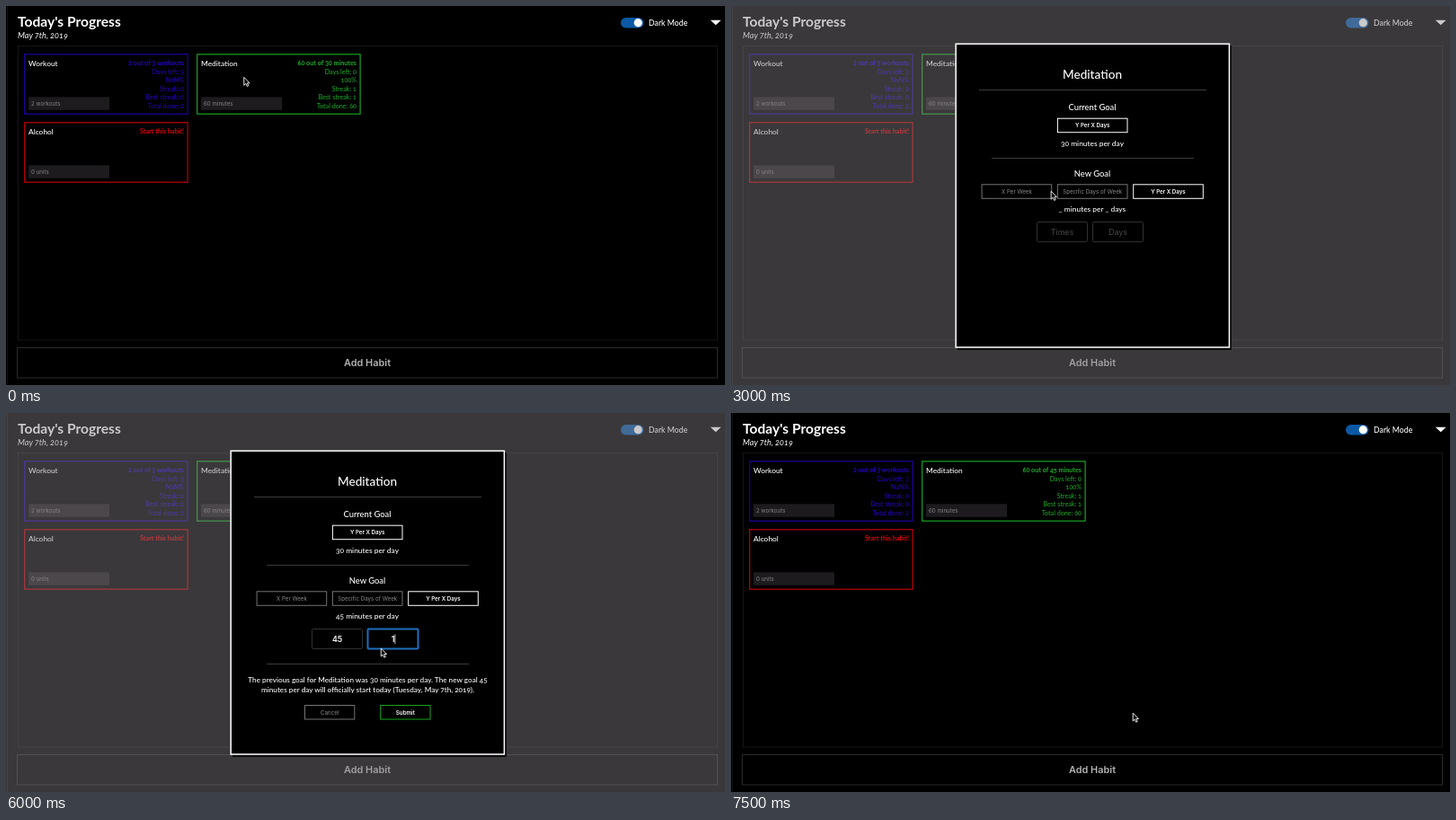
Animation of 800x422 px, one loop 8 s. Source, as an HTML page:

```html
<!DOCTYPE html>
<html lang="en">
<head>
<meta charset="utf-8">
<title>Habit tracker</title>
<style>
  html, body { margin: 0; width: 100%; height: 100%; overflow: hidden; background: #000; }
  svg { display: block; width: 100vw; height: 100vh; }
  text { font: 500 8.4px Lato, sans-serif; font-variant-numeric: oldstyle-nums; fill: #fff; }
  rect { fill: none; stroke-width: 1; }
  .mid { text-anchor: middle; }
  .end { text-anchor: end; }
  .title { font-size: 15.6px; font-weight: 700; }
  .date { font-size: 9.2px; font-weight: 400; font-style: italic; }
  .mode { font-size: 8.75px; }
  .stat { font-size: 7.2px; font-weight: 400; }
  .bold { font-weight: 700; }
  .ui { font: 6.2px Inter, sans-serif; }
  .hint { fill: #858385; }
  .add { font: 600 10.9px Inter, sans-serif; fill: #b4b4b4; }
  .heading { font-size: 13.6px; }
  .sub { font-size: 9.4px; }
  .message { font-size: 8.2px; }
  .field { font: 8.8px Inter, sans-serif; }
  .strong { font-weight: 600; }
  .faint { fill: #484848; }
  .muted { fill: #8a8a8a; }
  .entry { fill: #1d1b1d; }
  .panel { stroke: #151515; }
  .wide { stroke: #2a2a2a; }
  .grey { stroke: #747474; }
  .white { stroke: #fff; }
  .dark { stroke: #303030; }
  .menu { fill: #000; stroke: #2b2b2b; }
  .focus { stroke: #1d6fbe; stroke-width: 2; }
  .green { stroke: #16a51c; }
  .rule { stroke: #3a3a3a; }
</style>
</head>
<body>
<svg id="stage" viewBox="0 0 800 422" preserveAspectRatio="none"></svg>
<script>
const LOOP = 8000, STEP = 100;
const OPEN = 1500, FOCUS = 3800, FOUR = 4500, FIVE = 4600, NEXT = 5000, ONE = 5200, HOVER = 6700, CLOSE = 7300;

const text = (x, y, cls, str, attrs = '') => `<text x="${x}" y="${y}" class="${cls}" ${attrs}>${str}</text>`;
const rect = (x, y, w, h, cls, attrs = '') =>
  `<rect x="${x}" y="${y}" width="${w}" height="${h}" class="${cls}" ${attrs}/>`;
const rule = (x1, x2, y) => `<path d="M${x1} ${y}H${x2}" class="rule"/>`;
// Shown while the loop time lies in one of the [from, to) spans.
const during = (spans, body) => `<g data-on="${spans}">${body}</g>`;

const button = (x, y, w, label, border, cls) =>
  rect(x, y, w, 15.5, border) + text(x + w / 2, y + 10, 'ui mid ' + cls, label);

const card = (x, y, name, entry, border, color, stats) =>
  rect(x + .7, y + .8, 181.4, 66.4, '', `style="stroke:${border};stroke-width:1.2"`) +
  text(x + 5, y + 13.7, '', name) +
  rect(x + 5, y + 48.3, 90, 14.5, 'entry') + text(x + 8, y + 57.7, 'ui hint', entry) +
  stats.map((s, i) => text(x + 178, y + 13.3 + i * 9.5, 'stat end ' + (i ? '' : 'bold'), s, `style="fill:${color}"`)).join('');

const stats = (goal, left, rate, streak, total) =>
  [goal, 'Days left: ' + left, rate, 'Streak: ' + streak, 'Best streak: ' + streak, 'Total done: ' + total];
const meditation = minutes => card(212, 53, 'Meditation', '60 minutes', '#18a324', '#1fae2a',
  stats(`60 out of ${minutes} minutes`, 0, '100%', 1, 60));

const page =
  rect(0, 0, 800, 422, '', 'style="fill:#000"') +
  '<path d="M1.5 0V422" stroke="#121212"/>' +
  text(13, 22.6, 'title', "Today's Progress") + text(13, 36.4, 'date', 'May 7th, 2019') +
  '<rect x="684" y="13" width="25.5" height="11.4" rx="5.7" style="fill:#0b58a5"/><circle cx="703.3" cy="18.7" r="4.6" fill="#fff"/>' +
  text(715, 21.6, 'mode', 'Dark Mode') + '<path d="M783.8 15.8H795.6L789.7 21.3Z" fill="#fff"/>' +
  rect(13.5, 44.5, 778, 327.5, 'panel') +
  card(20, 53, 'Workout', '2 workouts', '#1f00a0', '#2700c4', stats('2 out of 3 workouts', 3, 'NaN%', 0, 2)) +
  during(`0-${CLOSE}`, meditation(30)) + during(`${CLOSE}-${LOOP}`, meditation(45)) +
  card(20, 129, 'Alcohol', '0 units', '#c00008', '#e00008', ['Start this habit!']) +
  rect(12.5, 380.5, 779, 33.5, 'wide') + text(402, 401.3, 'add mid', 'Add Habit');

const menu =
  during(`300-${OPEN}`, '<path d="M263 60.8H271.2L267.1 64.8Z" fill="#fff"/>') +
  during(`800-${OPEN}`, ['Suspend', 'Edit Goal', 'Add Note'].map((label, i) =>
    rect(263.5, 67.3 + i * 13, 51, 13, 'menu') + text(289, 76.3 + i * 13, 'ui mid', label)).join('')) +
  during(`1200-${OPEN}`, rect(263.5, 80.5, 50.5, 13.3, 'white'));

const goalLine = (spans, str) => during(spans, text(402, 229, 'mid', str));
const field = (spans, x, border, str, cls = '') =>
  during(spans, rect(x, 240.5, 56, 22, border, 'rx="1"') + text(x + 28, 254.9, 'field mid ' + cls, str));
const caret = (spans, x) => during(spans, `<path d="M${x} 246.5V257" stroke="#fff" stroke-width=".8"/>`);

const dialog = during(`${OPEN}-${CLOSE}`,
  rect(0, 0, 800, 422, '', 'style="fill:rgb(135,130,135);fill-opacity:.43"') +
  rect(252, 44, 305, 339, '', 'style="fill:#000;fill-opacity:.8"') +
  rect(250.2, 42.2, 304.2, 337.8, 'white', 'style="fill:#000;stroke-width:1.5"') +
  text(402, 80.6, 'heading mid', 'Meditation') + rule(276, 529, 93.5) +
  text(402, 116.2, 'sub mid', 'Current Goal') +
  button(363.4, 125.2, 77.6, 'Y Per X Days', 'white', 'strong') +
  text(402, 156, 'mid', '30 minutes per day') + rule(290, 515, 169.5) +
  text(402, 190, 'sub mid', 'New Goal') +
  button(279.1, 198.8, 77.6, 'X Per Week', 'grey', 'muted') +
  button(363.4, 198.8, 77.6, 'Specific Days of Week', 'grey', 'muted') +
  button(447.7, 198.8, 77.6, 'Y Per X Days', 'white', 'strong') +
  goalLine(`0-${FOUR}`, '_ minutes per _ days') + goalLine(`${FOUR}-${FIVE}`, '4 minutes per _ days') +
  goalLine(`${FIVE}-${ONE}`, '45 minutes per _ days') + goalLine(`${ONE}-${LOOP}`, '45 minutes per day') +
  field(`0-${FOCUS}`, 340.5, 'dark', 'Times', 'faint') + field(`${FOCUS}-${FOUR}`, 340.5, 'focus', 'Times', 'faint') +
  field(`${FOUR}-${FIVE}`, 340.5, 'focus', '4', 'strong') + field(`${FIVE}-${NEXT}`, 340.5, 'focus', '45', 'strong') +
  field(`${NEXT}-${LOOP}`, 340.5, 'dark', '45', 'strong') +
  field(`0-${NEXT}`, 402.5, 'dark', 'Days', 'faint') + field(`${NEXT}-${ONE}`, 402.5, 'focus', 'Days', 'faint') +
  field(`${ONE}-${LOOP}`, 402.5, 'focus', '1', 'strong') +
  caret(`${FOCUS}-4300`, 368.5) + caret(`${FOUR}-${FIVE}`, 371.9) + caret(`${FIVE}-${NEXT}`, 374.8) +
  caret(`${NEXT}-${ONE}`, 430.5) + caret(`${ONE}-5600,6000-6600,7100-${CLOSE}`, 432.9) +
  during(`${ONE}-${CLOSE}`,
    rule(290, 515, 279.5) +
    text(402.5, 299.8, 'message mid', 'The previous goal for Meditation was 30 minutes per day. The new goal 45') +
    text(402.5, 310.9, 'message mid', 'minutes per day will officially start today (Tuesday, May 7th, 2019).') +
    button(332.5, 325.5, 55.3, 'Cancel', 'grey', 'muted') +
    during(`${HOVER}-${CLOSE}`, rect(416.7, 325.5, 55.3, 15.5, '', 'style="fill:#0a9c0c"')) +
    button(416.7, 325.5, 55.3, 'Submit', 'green', 'strong')));

const pointers =
  during(`0-500,1500-3500,5800-${HOVER},${CLOSE}-${LOOP}`,
    '<path d="M0 0V9L2.1 7.1L3.5 10.2L5 9.5L3.6 6.5H6.3Z" fill="#000" stroke="#fff" stroke-width=".9"/>') +
  during(`500-1500,${HOVER}-${CLOSE}`,
    '<path d="M0 .7Q.8-.5 1.5 .7V3.6L4.9 4.4Q5.7 4.8 5.4 6.2L4.6 9.6H.6L-2.2 6Q-2.2 4.8-1 5.2L0 6Z" fill="#fff" stroke="#000" stroke-width=".7"/>') +
  during('3500-4400,4800-5200', '<path d="M-1.5-1H1.5M0-1V8M-1.5 8H1.5" fill="none" stroke="#ddd" stroke-width=".8"/>');

const stage = document.getElementById('stage');
stage.innerHTML = page + menu + dialog + `<g id="pointer">${pointers}</g>`;

// [time, x, y]
const path = [
  [0, 264.8, 79.3], [600, 266.5, 62], [1000, 266.5, 62], [1400, 288.3, 87], [1900, 288.3, 87],
  [2700, 352, 193], [3600, 368, 244], [4600, 368, 246], [5000, 417, 250], [5700, 417, 252],
  [6000, 417.3, 262], [6300, 417.3, 262], [6800, 447.2, 334], [LOOP, 447.2, 334]
];
const pointer = document.getElementById('pointer');
const toggles = [...stage.querySelectorAll('[data-on]')].map(el => ({
  el, spans: el.dataset.on.split(',').map(s => s.split('-').map(Number))
}));

function locate(t) {
  const i = path.findIndex(p => p[0] > t);
  const [t0, x0, y0] = path[i - 1], [t1, x1, y1] = path[i];
  const k = (t - t0) / (t1 - t0), e = k * k * (3 - 2 * k);
  return [x0 + (x1 - x0) * e, y0 + (y1 - y0) * e];
}

function draw(now) {
  const t = Math.floor((now % LOOP) / STEP) * STEP;
  for (const { el, spans } of toggles)
    el.style.display = spans.some(([from, to]) => t >= from && t < to) ? '' : 'none';
  pointer.setAttribute('transform', `translate(${locate(t)})`);
}

let start;
function tick(now) {
  start ??= now;
  draw(now - start);
  requestAnimationFrame(tick);
}
draw(0);
requestAnimationFrame(tick);
</script>
</body>
</html>
```
